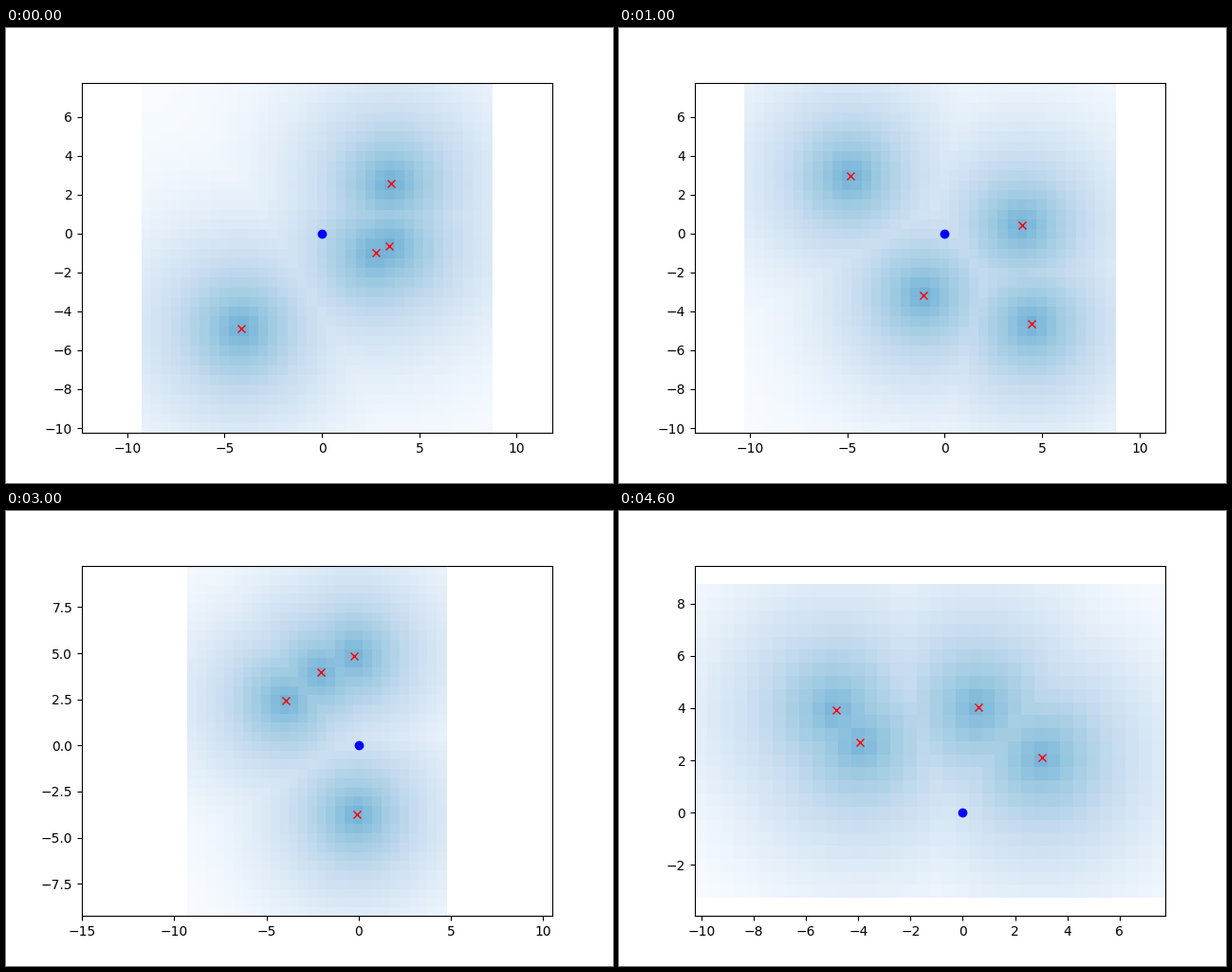
A matplotlib script that plays this animation: 640x480 px, repeating every 5000 ms.

```python
import math

import matplotlib.pyplot as plt
import numpy as np
from matplotlib.animation import FuncAnimation

RESO = 0.5    # cell size
MARGIN = 5.0  # map extent beyond the outermost obstacles
STD = 5.0     # spread of the gaussian

# Key points: four obstacles (x, y) per scene
SCENES = [
    [(3.55, 2.57), (2.77, -0.99), (3.45, -0.65), (-4.15, -4.88)],
    [(-4.84, 2.96), (-1.09, -3.18), (3.97, 0.43), (4.46, -4.64)],
    [(-1.16, 2.71), (-0.33, -3.37), (-0.09, -4.88), (1.95, -4.59)],
    [(-3.95, 2.43), (-2.04, 3.97), (-0.25, 4.85), (-0.09, -3.74)],
    [(-4.84, 3.93), (-3.94, 2.69), (0.60, 4.03), (3.03, 2.11)],
]

erfc = np.vectorize(math.erfc)


def centers_and_edges(values):
    """Grid lines along one axis, from the spread of the obstacles."""
    lo, hi = round(min(values) - MARGIN), round(max(values) + MARGIN)
    centers = np.arange(lo, hi, RESO)
    return centers, np.append(centers, hi) - RESO / 2


def gaussian_map(ox, oy):
    """Cell edges and the gaussian tail of the distance to the nearest obstacle."""
    cx, ex = centers_and_edges(ox)
    cy, ey = centers_and_edges(oy)
    x, y = np.meshgrid(cx, cy)
    dist = np.min([np.hypot(x - px, y - py) for px, py in zip(ox, oy)], axis=0)
    return ex, ey, 0.5 * erfc(dist / (STD * math.sqrt(2)))


fig, ax = plt.subplots(figsize=(6.4, 4.8), dpi=100)
fig.subplots_adjust(right=0.9001)  # keeps ticks that fall right on the frame


def update(i):
    ox, oy = zip(*SCENES[i])
    ax.cla()
    ax.pcolor(*gaussian_map(ox, oy), vmax=1.0, cmap="Blues")
    ax.axis("equal")
    ax.plot(ox, oy, "xr")
    ax.plot(0.0, 0.0, "ob")


anim = FuncAnimation(fig, update, frames=len(SCENES), interval=1000,
                     repeat=True, repeat_delay=0)
plt.show()
```
